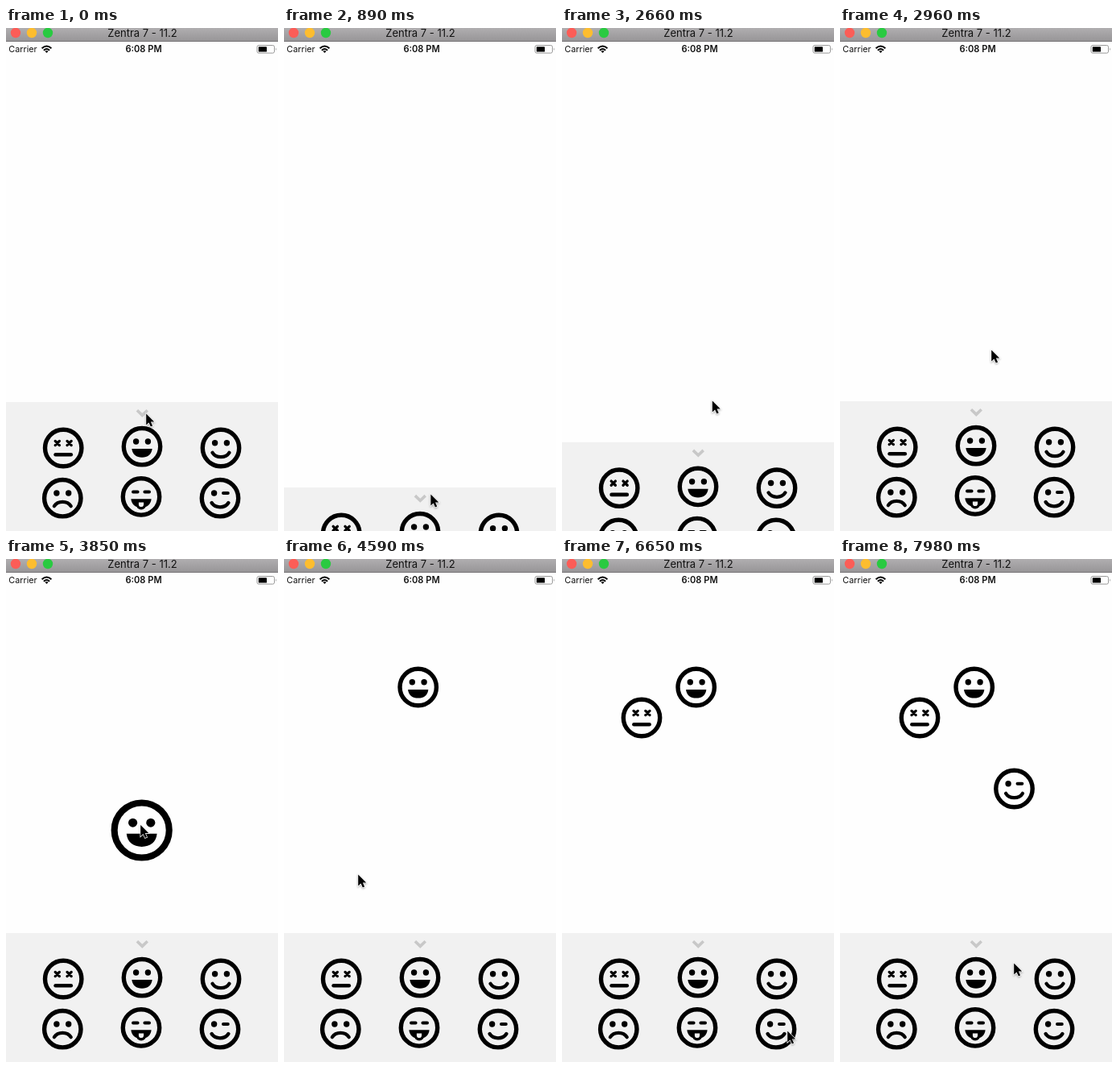
Write an HTML page that moves like this. It is 338x624 px and loops after 8 s.

```html
<!DOCTYPE html>
<html lang="en">
<head>
<meta charset="utf-8">
<title>Sticker panel</title>
<style>
  html, body { margin: 0; width: 100%; height: 100%; overflow: hidden; background: #fefefe; }
  svg { display: block; width: 338px; height: 624px; }
  text { font-family: Inter, "Liberation Sans", sans-serif; fill: #111; }
  .line { fill: none; stroke: #000; stroke-width: 4.3; stroke-linecap: round; }
</style>
</head>
<body>
<svg viewBox="0 0 338 624">
  <defs>
    <linearGradient id="bar" x2="0" y2="1">
      <stop stop-color="#b0aeb0"/><stop offset="1" stop-color="#969496"/>
    </linearGradient>
    <circle id="ring" r="22.7" fill="none" stroke="#000" stroke-width="5.4"/>
    <circle id="eye" r="3.7"/>
    <g id="eyes"><use href="#eye" x="-7.4" y="-6.2"/><use href="#eye" x="7.4" y="-6.2"/></g>
    <path id="mouth" d="M-12.6 2.9H12.6C12 9.8 7 13.6 0 13.6S-12 9.8 -12.6 2.9Z"/>
    <path id="smile" class="line" d="M-10.4 5.8C-6 12.9 6 12.9 10.4 5.8"/>
    <g id="dizzy">
      <use href="#ring"/>
      <path class="line" style="stroke-width:3.3" d="M-10 -8.6l5.2 5.2m0 -5.2l-5.2 5.2M4.8 -8.6l5.2 5.2m0 -5.2l-5.2 5.2"/>
      <path class="line" style="stroke-width:4.6" d="M-9.6 8.2H9.6"/>
    </g>
    <g id="grin"><use href="#ring"/><use href="#eyes"/><use href="#mouth"/></g>
    <g id="happy"><use href="#ring"/><use href="#eyes"/><use href="#smile"/></g>
    <g id="sad">
      <use href="#ring"/><use href="#eyes"/>
      <path class="line" d="M-10.4 10C-6 3 6 3 10.4 10"/>
    </g>
    <g id="tongue">
      <use href="#ring"/><use href="#mouth"/>
      <path class="line" style="stroke-width:4" d="M-10 -6h5.6M4.4 -6h5.6"/>
      <path d="M-6.5 5H6.5V9.6A6.5 6.5 0 0 1 -6.5 9.6Z"/>
      <path fill="#f1f1f1" d="M-3.1 7.2H3.1V9.6A3.1 3.1 0 0 1 -3.1 9.6Z"/>
    </g>
    <g id="wink">
      <use href="#ring"/><use href="#eye" x="-7.4" y="-6.2"/><use href="#smile"/>
      <path class="line" style="stroke-width:4" d="M4 -6.2H9.8"/>
    </g>
  </defs>

  <rect width="338" height="17" fill="url(#bar)"/>
  <rect y="16" width="338" height="1" fill="#777577"/>
  <circle cx="12" cy="6" r="6.2" fill="#fc5d57"/>
  <circle cx="32" cy="6" r="6.2" fill="#fdbd2f"/>
  <circle cx="52" cy="6" r="6.2" fill="#29ca41"/>
  <text x="169.5" y="11" font-size="13" text-anchor="middle">Zentra 7 - 11.2</text>

  <text x="3.3" y="30.4" font-size="10.8">Carrier</text>
  <g fill="none" stroke="#000" stroke-width="2">
    <path d="M44.6 25.2Q50.5 19.8 56.4 25.2M46.9 27.7Q50.5 24.4 54.1 27.7"/>
    <path d="M48.4 28.8Q50.5 27.2 52.6 28.8L50.5 31Z" fill="#000" stroke="none"/>
  </g>
  <text x="171" y="30.4" font-size="11.1" font-weight="600" text-anchor="middle">6:08 PM</text>
  <rect x="312" y="21.5" width="21.5" height="9.6" rx="2" fill="none" stroke="#999"/>
  <rect x="313.8" y="23.2" width="10.2" height="6.4" rx=".6"/>
  <path d="M335 24.5q1.6 1.8 0 3.6z" fill="#888"/>

  <g id="panel">
    <rect y="464" width="338" height="170" fill="#f1f1f1"/>
    <path d="M162.9 474.2L169.3 480.4L175.7 474.2" fill="none" stroke="#c8c8c8" stroke-width="3.6"/>
    <use href="#dizzy" x="71.2" y="521"/>
    <use href="#grin" x="169" y="519.2"/>
    <use href="#happy" x="267" y="521"/>
    <use href="#sad" x="70.3" y="583.2"/>
    <use href="#tongue" x="168" y="581.4"/>
    <use href="#wink" x="266" y="583.2"/>
  </g>
  <g id="stickers"></g>
  <path id="cursor" d="M1.2 1.6V15.6L4.5 12.6L6.8 17.6L9.1 16.6L6.9 11.6H11.2Z"
    stroke="#fff" stroke-width="1.4" paint-order="stroke" style="filter:drop-shadow(0 1px 1px #0005)"/>
</svg>
<script>
const $ = id => document.getElementById(id);
const LOOP = 8000, STEP = 147.8;

// Stops are [step, ...values], with eased motion between them.
const panelStops = [[2, 0], [8, 143], [15, 143], [20, -1], [22, 0]];
const cursorStops = [
  [2, 173, 477], [8, 184, 612], [14, 183, 610],                // pull the panel down
  [15, 183, 577], [20, 187, 398], [22, 187, 398],              // and up again
  [24, 168, 506], [28, 164, 151], [30, 164, 151],              // drag grin
  [31, 91, 390], [33, 64, 499], [34, 64, 499], [39, 107, 171], [41, 92, 175],   // drag dizzy
  [44, 285, 586], [45, 279, 584], [47, 274, 584], [51, 225, 292], [52, 224.5, 286],   // drag wink
  [54, 215, 500]
];

// A sticker is held at an offset (dx, dy) from the cursor until dropped.
const stickers = [
  { face: "grin", pick: 25, drop: 29, dx: 2.7, dy: 8 },
  { face: "dizzy", pick: 35, drop: 41, dx: 7, dy: 22 },
  { face: "wink", pick: 47, drop: 52, dx: -8, dy: -1 }
];

for (const s of stickers) {
  s.el = document.createElementNS("http://www.w3.org/2000/svg", "use");
  s.el.setAttribute("href", "#" + s.face);
  $("stickers").append(s.el);
}

const ease = p => p * p * (3 - 2 * p);

function at(stops, k) {
  const i = stops.findIndex(stop => stop[0] >= k);
  if (i < 1) return stops.at(i).slice(1);
  const [start, ...from] = stops[i - 1], [end, ...to] = stops[i];
  const p = ease((k - start) / (end - start));
  return from.map((v, j) => v + (to[j] - v) * p);
}

function place(el, x, y, scale = 1) {
  el.setAttribute("transform", `translate(${x} ${y}) scale(${scale})`);
}

function draw() {
  const k = Math.floor((performance.now() % LOOP + 20) / STEP);
  place($("panel"), 0, ...at(panelStops, k));
  place($("cursor"), ...at(cursorStops, k));
  for (const s of stickers) {
    const [x, y] = at(cursorStops, Math.min(k, s.drop));
    s.el.style.display = k < s.pick ? "none" : "";
    place(s.el, x + s.dx, y + s.dy, k < s.drop ? 1.5 : 1);
  }
  requestAnimationFrame(draw);
}
draw();
</script>
</body>
</html>
```
